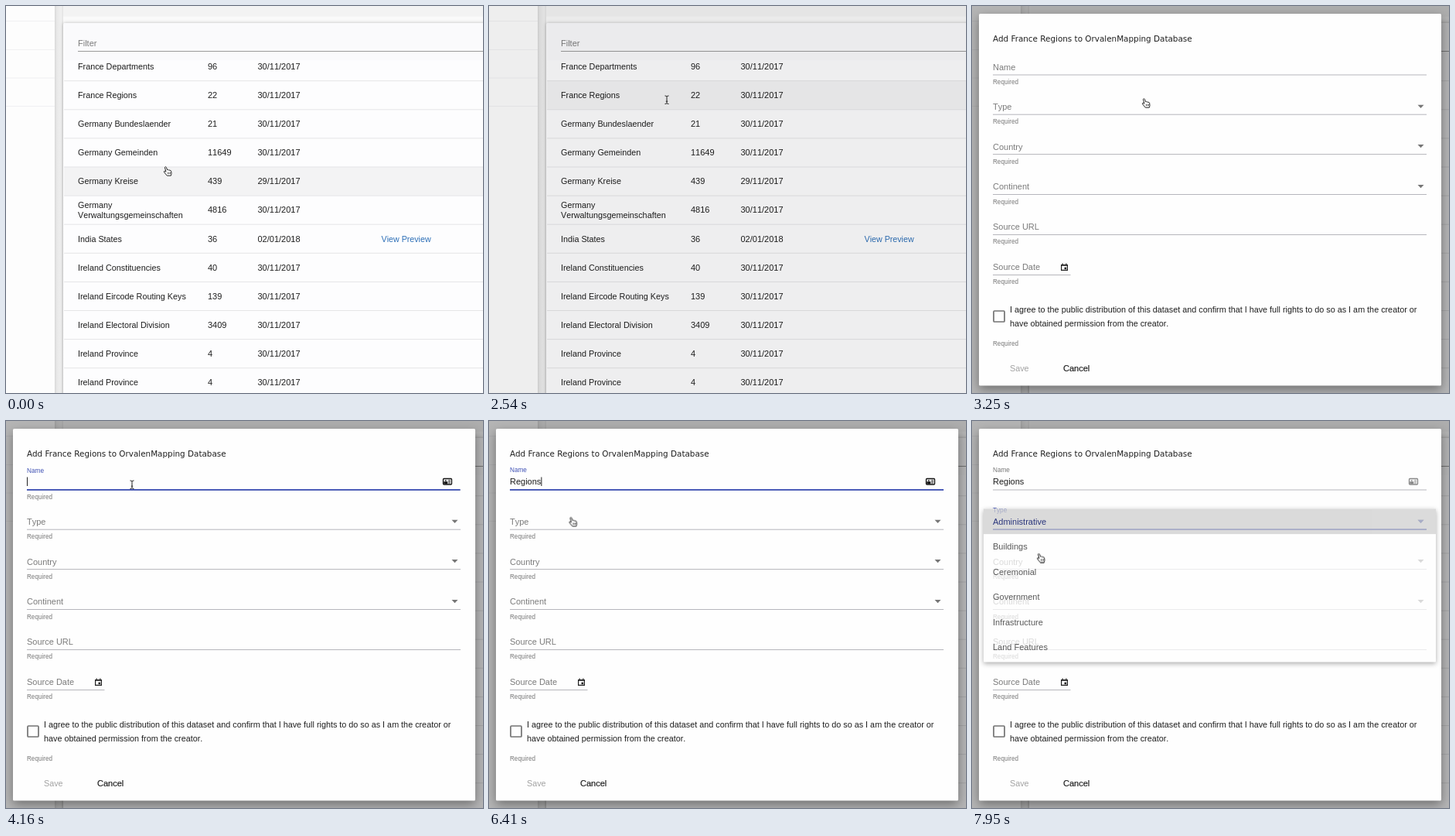
Animation of 617 by 500 pixels, one loop 8 s. Source, as an HTML page:

```html
<!DOCTYPE html>
<html lang="en">
<head>
<meta charset="utf-8">
<title>Add dataset dialog</title>
<style>
  html, body { margin: 0; width: 100%; height: 100%; overflow: hidden; background: #fdfdfd; }
  svg { display: block; width: 100vw; height: 100vh; }
  text { font: 10.8px "Liberation Sans", Arial, sans-serif; font-kerning: none; fill: #1e1e1e; white-space: pre; }
  .num, .big, .label { font-size: 11px; }
  .label { fill: #7b7b7b; }
  .hint { font-size: 8.15px; fill: #777; }
  .title { font: 10.4px "DejaVu Sans", sans-serif; }
  .link { font-size: 10.7px; fill: #2d6fb7; }
  .off { fill: #a3a3a3; }
  .strong { stroke: #1e1e1e; stroke-width: .2px; }
  .rule { fill: #b6b6bc; }
  .sheet { fill: #fefefe; filter: drop-shadow(0 5px 7px rgba(0, 0, 0, .38)); }
  .menu { fill: #fefefe; filter: drop-shadow(0 2px 3px rgba(0, 0, 0, .45)); }

  .anim { animation: 8s linear infinite; }
  .step { animation: 8s step-end infinite; }

  #hover { animation-name: hover; }
  @keyframes hover {
    0% { transform: none; opacity: 1; }
    13.5% { transform: translateY(-37.1px); opacity: 1; }
    18.6% { transform: translateY(-74.2px); opacity: 1; }
    22.5% { transform: translateY(-111.3px); opacity: 1; }
    33.5%, 100% { transform: translateY(-111.3px); opacity: 0; }
  }

  #backdrop { animation-name: dim; }
  @keyframes dim {
    0%, 31.4% { opacity: 0; }
    31.75% { opacity: .06; }
    34.375% { opacity: .21; }
    36.25%, 100% { opacity: .288; }
  }

  #dialog { animation-name: dialog; transform-origin: 308px 250px; }
  @keyframes dialog {
    0%, 33.525% { opacity: 0; transform: translateY(120px) scale(.9); animation-timing-function: cubic-bezier(.25, .8, .25, 1); }
    38.525%, 100% { opacity: 1; transform: translateY(0) scale(1); }
  }

  #nameLabel { animation-name: nameFloat; transform-origin: 27px 79px; }
  @keyframes nameFloat {
    0%, 48.75% { transform: none; fill: #7b7b7b; animation-timing-function: cubic-bezier(.25, .8, .25, 1); }
    53.75%, 83.75% { transform: translateY(-15.7px) scale(.745); fill: #3f51b5; }
    84.5%, 100% { transform: translateY(-15.7px) scale(.745); fill: #777; }
  }
  #nameLine { animation-name: nameLine; transform-origin: 307px 89px; }
  @keyframes nameLine {
    0%, 48.75% { transform: scaleX(.3); opacity: 0; animation-timing-function: cubic-bezier(.25, .8, .25, 1); }
    52.5%, 83.75% { transform: none; opacity: 1; }
    84.5%, 100% { transform: none; opacity: 0; }
  }
  #card { animation-name: card; }
  @keyframes card { 0% { opacity: 0; } 48.75% { opacity: 1; } 83.75%, 100% { opacity: .5; } }
  #nameHint { animation-name: nameHint; }
  @keyframes nameHint { 0% { opacity: 1; } 55%, 100% { opacity: 0; } }

  #typeLabel { animation-name: typeFloat; transform-origin: 27px 130px; }
  @keyframes typeFloat {
    0%, 83.75% { transform: none; fill: #7b7b7b; animation-timing-function: cubic-bezier(.25, .8, .25, 1); }
    87%, 100% { transform: translateY(-15.3px) scale(.745); fill: #3f51b5; }
  }
  #typeLine, #typeArrow { animation-name: open; }
  @keyframes open { 0% { opacity: 0; } 83.75%, 100% { opacity: 1; } }
  #typeHint { animation-name: typeHint; }
  @keyframes typeHint { 0% { opacity: 1; } 97.3%, 100% { opacity: 0; } }
  #typeValue { animation-name: chosen; }
  @keyframes chosen { 0% { opacity: 0; } 97.3%, 100% { opacity: 1; } }

  #panel { animation-name: panel; transform-origin: 307px 113px; }
  @keyframes panel {
    0%, 83.75% { opacity: 0; transform: scaleY(.8); animation-timing-function: cubic-bezier(0, 0, .2, 1); }
    85.25%, 98.56% { opacity: 1; transform: none; }
    100% { opacity: .54; transform: none; }
  }
  #optionBack { animation-name: optionBack; }
  @keyframes optionBack { 0%, 97.3% { fill: #f4f4f4; } 98.3%, 100% { fill: #cecece; } }
  #option0 { animation-name: optionText; }
  @keyframes optionText { 0% { fill: #1e1e1e; } 97.3%, 100% { fill: #303f9f; } }

  #pointer { animation-name: pointer; animation-timing-function: ease-in-out; }
  @keyframes pointer {
    0%, 11.25% { transform: translate(209px, 214px); }
    27.5%, 36.25% { transform: translate(230px, 121px); }
    40.625% { transform: translate(225px, 126px); }
    47.5%, 73.75% { transform: translate(163px, 82px); }
    81.25%, 97.3% { transform: translate(106px, 133px); }
    99.375%, 100% { transform: translate(89px, 177.5px); }
  }
  #hand { animation-name: hand; }
  @keyframes hand {
    0% { opacity: 1; } 31% { opacity: 0; } 36.5% { opacity: 1; }
    43.5% { opacity: 0; } 76%, 100% { opacity: 1; }
  }
  #beam { animation-name: beam; }
  @keyframes beam {
    0% { opacity: 0; } 31% { opacity: 1; } 36.5% { opacity: 0; }
    43.5% { opacity: 1; } 54%, 100% { opacity: 0; }
  }
  #arrow { animation-name: arrow; }
  @keyframes arrow { 0% { opacity: 0; } 54% { opacity: 1; } 76%, 100% { opacity: 0; } }
</style>
</head>
<body>
<svg id="stage" viewBox="0 0 617 500" preserveAspectRatio="none"></svg>
<script>
const LOOP = 8000;
const ROW = 37.1;
const stage = document.getElementById('stage');

// y is the optical middle of the line
const text = (x, y, str, cls = '', id = '') =>
  `<text x="${x}" y="${y + 3.9}" class="${cls}" ${id && `id="${id}"`}>${str}</text>`;
const rect = (x, y, w, h, attrs) =>
  `<rect x="${x}" y="${y}" width="${w}" height="${h}" ${attrs}/>`;
const hint = (y, cls = '', id = '') =>
  `<text x="27" y="${y + 2.9}" class="hint ${cls}" ${id && `id="${id}"`}>Required</text>`;
const caretDown = (y, attrs) => `<path d="M576.5 ${y - 2}h8l-4 4.2z" ${attrs}/>`;

const datasets = [
  ['France Departments', 96], ['France Regions', 22], ['Germany Bundeslaender', 21],
  ['Germany Gemeinden', 11649], ['Germany Kreise', 439, '29/11/2017'],
  ['Germany|Verwaltungsgemeinschaften', 4816], ['India States', 36, '02/01/2018'],
  ['Ireland Constituencies', 40], ['Ireland Eircode Routing Keys', 139],
  ['Ireland Electoral Division', 3409], ['Ireland Province', 4], ['Ireland Province', 4],
];

function tableRow([name, count, date = '30/11/2017'], i) {
  const y = 78 + ROW * i;
  const lines = name.split('|');
  return lines.map((line, k) => text(93, y + (k - (lines.length - 1) / 2) * 12.4, line)).join('')
    + text(261, y, count, 'num') + text(325.5, y, date, 'num')
    + (name === 'India States' ? text(485.5, y, 'View Preview', 'link') : '')
    + rect(75, y + 18.2, 542, 1, 'fill="#e5e5e7"');
}

const page = `
  <defs><linearGradient id="edge">
    <stop offset="0" stop-color="#d8d8d8"/><stop offset=".25" stop-color="#e8e8e8"/>
    <stop offset=".75" stop-color="#f0f0f0"/><stop offset="1" stop-color="#e2e2e2"/>
  </linearGradient></defs>
  ${rect(0, 0, 617, 500, 'fill="#fdfdfd"')}
  ${[19, 56, 92.5, 129].map(y => rect(0, y, 63, 1, 'fill="#f0f0f2"')).join('')}
  ${rect(63, 0, 554, 500, 'fill="#fafafa"')}
  ${rect(63, 0, 554, 13.5, 'fill="#f3f3f3"')}
  ${rect(63, 0, 11, 500, 'fill="url(#edge)"')}
  ${rect(74, 22, 560, 500, 'rx="2" fill="#fdfdfe" style="filter:drop-shadow(0 0 2px rgba(0,0,0,.25))"')}
  ${rect(75, 22, 542, 48, 'fill="#fafafc"')}
  ${rect(75, 207.8, 542, ROW, 'id="hover" class="step" fill="#f3f3f4"')}
  ${text(93, 48, 'Filter', 'label')}
  ${rect(93, 58, 524, 1, 'fill="#9a9a9a"')}
  ${datasets.map(tableRow).join('')}
  ${rect(0, 0, 617, 500, 'id="backdrop" class="anim"')}`;

const selects = [['Type', 130.2], ['Country', 181.6], ['Continent', 233.5]].map(([name, y]) => {
  const isType = name === 'Type';
  return text(27, y, name, 'label' + (isType ? ' anim' : ''), isType ? 'typeLabel' : '')
    + rect(27, y + 9.5, 561, 1, 'class="rule"')
    + caretDown(y - .5, 'fill="#767676"')
    + hint(y + 19.2, isType ? 'step' : '', isType ? 'typeHint' : '');
}).join('');

const options = ['Administrative', 'Buildings', 'Ceremonial', 'Government', 'Infrastructure', 'Land Features'];

const dialog = `<g id="dialog" class="anim">
  ${rect(9, 10, 598, 480.5, 'rx="1.5" class="sheet"')}
  ${text(27, 42, 'Add France Regions to OrvalenMapping Database', 'title')}
  ${text(27, 79, 'Name', 'label anim', 'nameLabel')}
  ${rect(27, 88.5, 561, 1, 'class="rule"')}
  ${rect(27, 88, 561, 1.8, 'id="nameLine" class="anim" fill="#3f51b5"')}
  ${hint(98.5, 'step', 'nameHint')}
  ${text(27, 78.3, '', 'big', 'typed')}
  ${rect(0, 72.5, 1, 11.5, 'id="caret" fill="#222"')}
  <g id="card" class="step" fill="none" stroke="#111">
    <rect x="565.5" y="74.5" width="11" height="7.5" rx="1" stroke-width="1.3"/>
    <path d="M567 80.5v-1.5h3.6v1.5zM568 77h1.6" stroke-width="1.4"/>
    <path d="M572 76.7h3M572 78.4h3M572 80.1h3" stroke-width=".8"/>
  </g>
  ${selects}
  ${rect(27, 139.2, 561, 1.8, 'id="typeLine" class="step" fill="#3f51b5"')}
  ${caretDown(129.7, 'id="typeArrow" class="step" fill="#3f51b5"')}
  ${text(27, 130, options[0], 'big step', 'typeValue')}
  ${text(27, 285.5, 'Source URL', 'label')}
  ${rect(27, 295, 561, 1, 'class="rule"')}${hint(304.5)}
  ${text(27, 337, 'Source Date', 'label')}
  ${rect(27, 347, 100.5, 1, 'class="rule"')}${hint(356.3)}
  <path d="M115.6 334.6h7.8v6.8h-7.8zM115.6 335.2h7.8M117.2 332.5v2M121.8 332.5v2" fill="none" stroke="#222" stroke-width="1.2"/>
  ${rect(119.5, 337.6, 2.6, 2.6, 'fill="#222"')}
  ${rect(28, 394, 14, 14, 'rx="1" fill="none" stroke="#737373" stroke-width="1.7"')}
  ${text(49, 392.2, 'I agree to the public distribution of this dataset and confirm that I have full rights to do so as I am the creator or')}
  ${text(49, 410.5, 'have obtained permission from the creator.')}
  ${hint(436)}
  ${text(49, 467.7, 'Save', 'off')}
  ${text(118, 467.7, 'Cancel', 'big strong')}
</g>`;

const panel = `<g id="panel" class="anim">
  ${rect(15, 113.5, 585, 198, 'rx="1" class="menu"')}
  ${rect(15, 113.5, 585, 32.6, 'id="optionBack" class="anim"')}
  ${options.map((name, i) => text(27, 130 + 32.45 * i, name, i ? 'big' : 'big step', 'option' + i)).join('')}
</g>`;

const pointer = `<g id="pointer" class="anim">
  <g id="hand" class="step" fill="#fff" stroke="#222" stroke-linejoin="round">
    <path d="M-3.6 -5.6q1 -1.4 2 0l1.2 3.4q1 -.9 1.7 .3q1 -.7 1.7 .4q1.2 -.5 1.6 .8l.4 3q-.1 1.3 -.7 2.9h-5l-3.6 -4.3q-.9 -1.5 .5 -1.7l1.7 1z"/>
    <path d="M.3 .8v2.4M1.9 .8v2.4M3.4 .8v2.4" stroke-width=".7"/>
  </g>
  <path id="beam" class="step" d="M-2.5 -5q2 0 2.5 1q.5 -1 2.5 -1M0 -4v8.5M-2.5 5.5q2 0 2.5 -1q.5 1 2.5 1M-1.2 2.2h2.4" fill="none" stroke="#222"/>
  <path id="arrow" class="step" d="M-2 -5.5v9.6l2.2 -2l1.4 3.3l1.6 -.7l-1.4 -3.2h3z" fill="#111" stroke="#fff" stroke-width=".7"/>
</g>`;

stage.innerHTML = page + dialog + panel + pointer;

const typed = document.getElementById('typed');
const caret = document.getElementById('caret');
const clock = document.getElementById('backdrop').getAnimations()[0];
const word = 'Regions';
const typing = { focus: 3900, start: 4400, perKey: 140, blur: 6700 };

function frame() {
  const t = (clock.currentTime || 0) % LOOP;
  const count = Math.max(0, Math.min(word.length, Math.floor((t - typing.start) / typing.perKey) + 1));
  const shown = word.slice(0, count);
  if (typed.textContent !== shown) typed.textContent = shown;

  const typingEnd = typing.start + (word.length - 1) * typing.perKey;
  const lit = t < typingEnd || Math.floor((t - typingEnd) / 500) % 2 === 0;
  const focused = t >= typing.focus && t < typing.blur;
  caret.setAttribute('x', 27 + (shown ? typed.getComputedTextLength() : 0));
  caret.setAttribute('opacity', focused && lit ? 1 : 0);
  requestAnimationFrame(frame);
}
frame();
</script>
</body>
</html>
```
